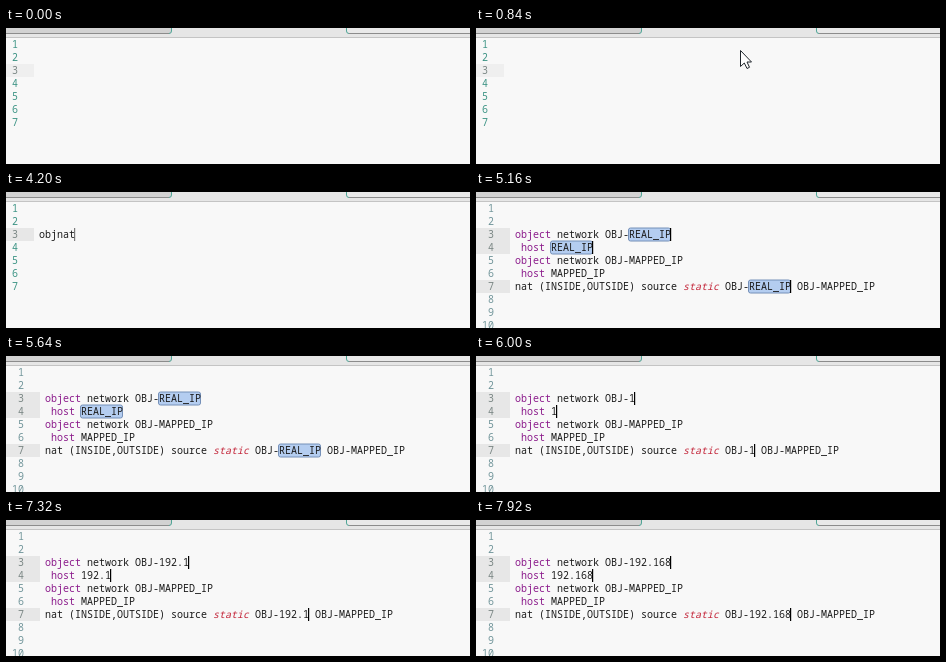
Animation, 464 px wide and 136 px high, one loop 8 s. Source, as an HTML page:

```html
<!DOCTYPE html>
<html lang="en">
<head>
<meta charset="utf-8">
<title>Snippet editor</title>
<style>
html, body { margin: 0; width: 100%; height: 100%; overflow: hidden; background: #f8f8f8; }
svg { display: block; }
text { font: 10px "Noto Sans Mono", monospace; white-space: pre; fill: #1c1c1c; }
.key { fill: #8c1c8c; }
.mod { fill: #c4283c; font-style: italic; }
.num { fill: #3d9485; }
.wide .num { fill: #71959a; }
.num.on { fill: #7b8785; }
</style>
</head>
<body>
<svg width="464" height="136" viewBox="0 0 464 136">
  <rect width="464" height="9" fill="#e6e6e6"/>
  <rect y="9" width="464" height="1" fill="#c4c4c4"/>
  <path d="M0 0H165.5V3.500Q165.500 5.500 163.500 5.500H0" fill="#d2d2d2"/>
  <path d="M341 0V3.500Q341 5.500 343 5.500H464V0" fill="#e9e9e9"/>
  <path d="M0 5.500H163M343 5.500H464" stroke="#8c8c8c"/>
  <path d="M163 5.500Q165.500 5.500 165.500 3V0M340.500 0V3Q340.500 5.500 343 5.500" fill="none" stroke="#4fa596"/>
  <g id="editor"></g>
  <path id="mouse" d="M.5 .5V16.500L4.300 13L7 18.500L9.500 17.300L7 12H11.500Z" fill="#fff" stroke="#20262c"/>
</svg>
<script>
const LOOP = 8000, STEP = 120, ROW = 13, CHAR = 6, EXPAND = 5160;
const editor = document.getElementById('editor');
const mouse = document.getElementById('mouse');

const trigger = 'objnat';
const triggerTimes = [3120, 3360, 3480, 3600, 3600, 3720];
const address = '192.168';
const addressTimes = [6000, 6360, 6720, 7080, 7320, 7680, 7920];

// [time, x, y] of the pointer tip
const pointer = [[480, 308, 112], [720, 273, 40], [840, 264, 22], [1080, 264, 21],
                 [1200, 274, 21], [1320, 304, 17], [1560, 434, 1]];
// [time, opacity] of the text caret
const blink = [[0, 0], [1920, 1], [2280, 0], [2520, .6], [2640, 1], [2880, 0], [3120, 1],
               [4200, .5], [4320, 0], [4800, 1], [5400, .5], [5520, 0], [5760, .5], [5880, 1]];

const count = (times, t) => times.filter(at => at <= t).length;
const top_ = row => 10 + ROW * (row - 1);
const rect = (x, row, w, style) =>
  `<rect x="${x}" y="${top_(row)}" width="${w}" height="${ROW}" ${style}/>`;
const text = (x, row, s, cls = '') =>
  `<text x="${x}" y="${top_(row) + 10}" class="${cls}">${s}</text>`;

function gutter(lines, active, width, color) {
  let out = active.map(row => rect(0, row, width, `fill="${color}"`)).join('');
  for (let n = 1; n <= lines; n++) {
    const x = width - 16 - CHAR * String(n).length;
    out += text(x, n, n, active.includes(n) ? 'num on' : 'num');
  }
  return out;
}

const caret = (x, row, alpha) => rect(x - 1, row, 1.2, `fill="#000" opacity="${alpha}"`);

function typingView(t, alpha) {
  const typed = trigger.slice(0, count(triggerTimes, t));
  return gutter(7, [3], 28, t < 1920 ? '#efefef' : '#e7e7e7') +
    text(33, 3, typed) + caret(33 + typed.length * CHAR, 3, alpha);
}

function snippetView(t, alpha) {
  const typed = address.slice(0, count(addressTimes, t));
  const field = typed || 'REAL_IP';
  const lines = [
    [3, 'object', ' network OBJ-@'],
    [4, ' host', ' @'],
    [5, 'object', ' network OBJ-MAPPED_IP'],
    [6, ' host', ' MAPPED_IP'],
    [7, '', 'nat (INSIDE,OUTSIDE) source static OBJ-@ OBJ-MAPPED_IP']
  ];
  let out = gutter(10, [3, 4, 7], 34, '#e7e7e7');
  for (const [row, key, rest] of lines) {
    const start = (key + rest).indexOf('@');
    const x = 39 + start * CHAR, w = field.length * CHAR;
    if (start >= 0 && !typed)
      out += rect(x - .5, row, w, 'rx="2" fill="#b4cdf0" stroke="#7590b8"');
    const body = rest.replace('@', field).replace('static', '<tspan class="mod">static</tspan>');
    out += text(39, row, `<tspan class="key">${key}</tspan>${body}`);
    if (start >= 0) out += caret(x + w, row, alpha);
  }
  return out;
}

function movePointer(t) {
  const i = pointer.findIndex(p => p[0] > t);
  const visible = t >= 480 && t < 1680;
  mouse.style.display = visible ? '' : 'none';
  if (!visible) return;
  const [t0, x0, y0] = pointer[i < 0 ? pointer.length - 1 : i - 1];
  const [t1, x1, y1] = pointer[i < 0 ? pointer.length - 1 : i];
  const k = t1 > t0 ? (t - t0) / (t1 - t0) : 0;
  const x = Math.round(x0 + (x1 - x0) * k), y = Math.round(y0 + (y1 - y0) * k);
  mouse.setAttribute('transform', `translate(${x} ${y})`);
}

let shown = -1;
function draw() {
  const t = Math.floor(performance.now() % LOOP / STEP) * STEP;
  if (t !== shown) {
    shown = t;
    const alpha = blink[count(blink.map(b => b[0]), t) - 1][1];
    editor.setAttribute('class', t < EXPAND ? '' : 'wide');
    editor.innerHTML = (t < EXPAND ? typingView : snippetView)(t, alpha);
    movePointer(t);
  }
  requestAnimationFrame(draw);
}
draw();
</script>
</body>
</html>
```
